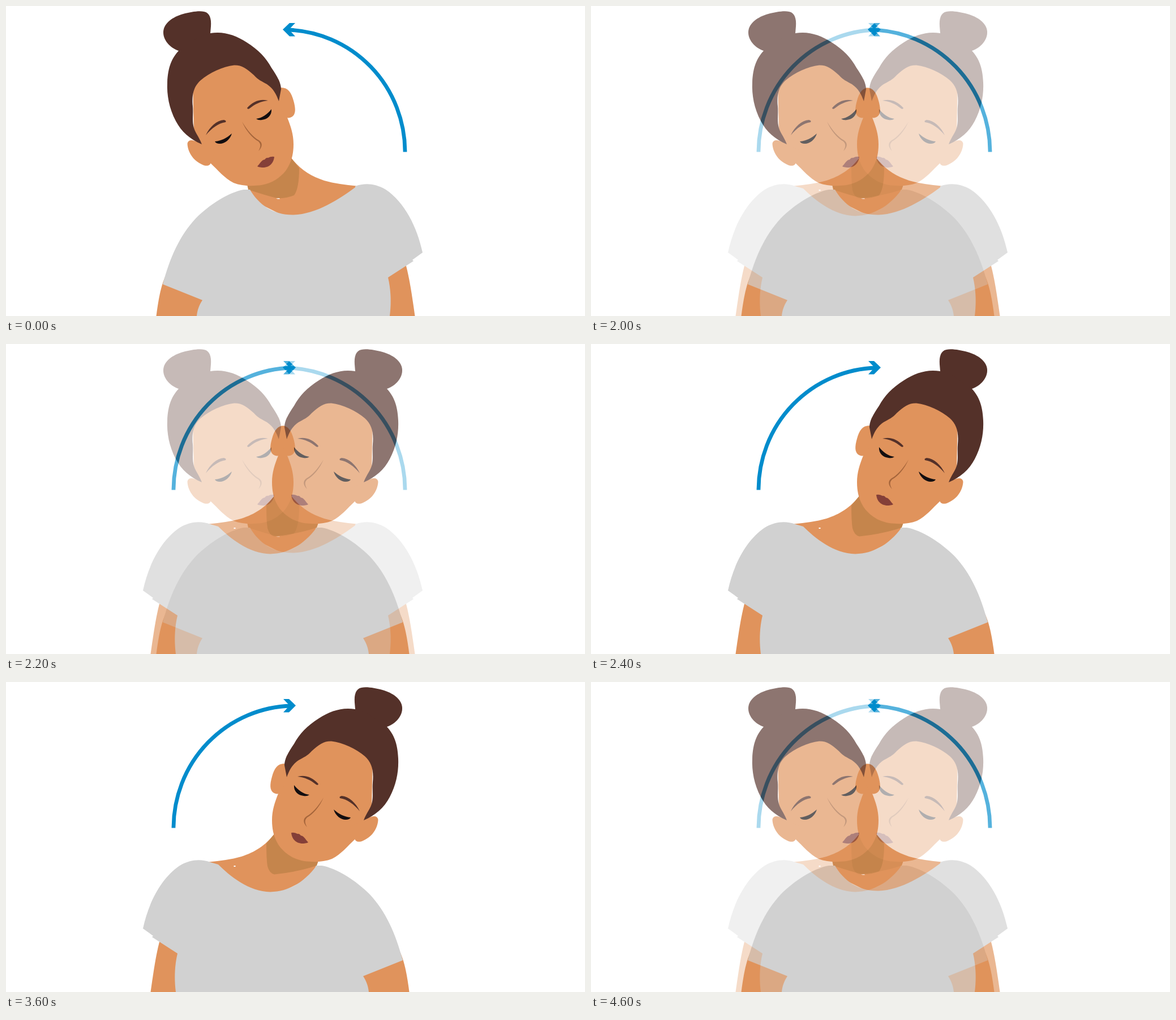
An HTML page that plays this animation: 1023 px wide and 547 px high, repeating every 4800 ms.

```html
<!DOCTYPE html>
<html lang="en">
<head>
<meta charset="utf-8">
<title>Neck stretch</title>
<style>
  html, body { margin: 0; width: 100%; height: 100%; overflow: hidden; background: #fff; }
  svg { position: absolute; left: 0; top: 0; display: block; }
</style>
</head>
<body>
<script>
const W = 1023, H = 547;
const LOOP = 4800;

const SKIN = '#e0935c', SHADE = '#c5854c', HAIR = '#543129', SHIRT = '#d1d1d1';
const LIPS = '#843f38', LASH = '#120e10', NOSE = '#a5653b', BLUE = '#008ccc';

const fill = (color, d) => `<path fill="${color}" d="${d}"/>`;
const flip = (sum, body) => `<g transform="translate(${sum} 0) scale(-1 1)">${body}</g>`;

// Neck parts that differ a little between the two sides.
const leanLeft = {
  collar: 'L617 320C590 340 547 368.500 506 368.500C472 368.500 447 351 431 324Z',
  shade: 'M426 315L428 324Q458 334 480 339.500Q497 339 509 334Q518 322 518 286L503 267Z',
  speck: 'M477 339.500L483 339L484 340.500L480 340.500Z'
};
const leanRight = {
  collar: 'L603 322C583 342 549 370 511 370.500C474 370 447 348 430 325Z',
  shade: 'M426 315L429 324Q462 335 504 339.500Q513 337 516 325Q518 312 518 285L503 267Z',
  speck: 'M572.500 324h3v2h-3z'
};

const arms =
  fill(SKIN, 'M285 470C275 488 270 512 265.500 547H345L360 480Z') +
  fill(SKIN, 'M706 455C713 480 718 515 722.500 547H670V475Z');

const shirt = collar => fill(SHIRT,
  'M431 324L420 324C393 329 360 350 335 375C307 405 290 443 277 491L347 519' +
  'C341 528 338 537 337 547H678C681 523 680 500 675 479L720 450L718 448L736 435' +
  'C726 389 704 346 671 324C652 313 634 312 617 318' + collar);

const head =
  // face and ears
  fill(SKIN, 'M330 130L332 225L361 277C375 290 386 304 402 312C417 318 436 318 451 316' +
    'C470 313 484 303 494 291C504 277 508 262 508 244C508 226 503 212 497 197L482 130L400 95Z') +
  fill(SKIN, 'M345 243C332 236 322 234 320.500 243C321 257 330 272 345 279C354 284 361 282 362 276L370 255Z') +
  fill(SKIN, 'M484 144C498 143 504 152 508 167C512 181 512 190 506 195C502 198 497 198 493 196L478 165Z') +
  // bun, then hair
  fill(HAIR, 'M305 79C290 74 277 60 278 45C279 30 295 19 313 14C325 11 340 8 350 10C360 12 363 22 362 36L361 48L350 85Z') +
  fill(HAIR, 'M305 79L340 55L361 48C384 44 405 51 425 64C446 77 460 92 469 109C480 125 486 136 486 147L482 168' +
    'C478 157 473 146 461 138C452 133 445 130 438 122C425 110 416 104 403 104.500C383 107 359 118 344 131' +
    'C332 142 328 155 330 177C331 190 329 200 331 211C333 223 341 230 346 244' +
    'C325 235 310 222 300 203C288 180 284 157 285 135C286 108 293 92 305 79Z') +
  // brows
  fill(HAIR, 'M426 180C436 168 450 163 463 167C450 168 440 173 430 181Q427 183 426 180Z') +
  fill(HAIR, 'M353 228C360 213 372 202 385 201Q390 202 388 205C375 207 364 215 353 228Z') +
  // closed eyes
  fill(LASH, 'M442 199C452 198 462 191 469 182C470 193 462 200 452 201Q446 202 442 199Z') +
  fill(LASH, 'M369 239C380 238 390 233 399 225C396 236 386 243 378 243Q371 243 369 239Z') +
  // nose and mouth
  fill(NOSE, 'M417 204C426 219 437 232 447 237C454 242 453 249 446 256C450 249 451 244 446 239C435 233 424 220 417 204Z') +
  fill(LIPS, 'M444 283C449 278 451 272 457 271Q460 267 463 268Q468 265 474 266C473 277 466 284 456 285Q448 285 444 283Z');

const person = side =>
  arms +
  fill(SKIN, 'M503 267C520 289 538 300 562 308C580 313 600 316 619 317.500L612 345L510 380L440 345L427 318Z') +
  fill(SHADE, side.shade) +
  fill('#fff', side.speck) +
  shirt(side.collar) +
  head;

const arrow =
  `<path d="M705 257.500A214 215.500 0 0 0 497 42" fill="none" stroke="${BLUE}" stroke-width="6.800"/>` +
  fill(BLUE, 'M489 41.500L501 30H511L500 41.500L511 53.500H501Z');

const page = `<rect width="${W}" height="${H}" fill="#fff"/>`;

document.body.innerHTML =
  `<svg width="${W}" height="${H}" viewBox="0 0 ${W} ${H}">` +
  `<g>${page}${person(leanLeft)}${arrow}</g>` +
  `<g id="right" opacity="0">${page}${flip(978, person(leanRight))}${flip(1001, arrow)}</g>` +
  '</svg>';

// [start in ms, opacity of the right-leaning pose]
const steps = [[0, 0], [2000, 1 / 3], [2200, 2 / 3], [2400, 1], [4400, 2 / 3], [4600, 1 / 3], [LOOP, 0]];

document.getElementById('right').animate(
  steps.map(([at, opacity]) => ({ offset: at / LOOP, opacity, easing: 'steps(1, end)' })),
  { duration: LOOP, iterations: Infinity }
);
</script>
</body>
</html>
```
